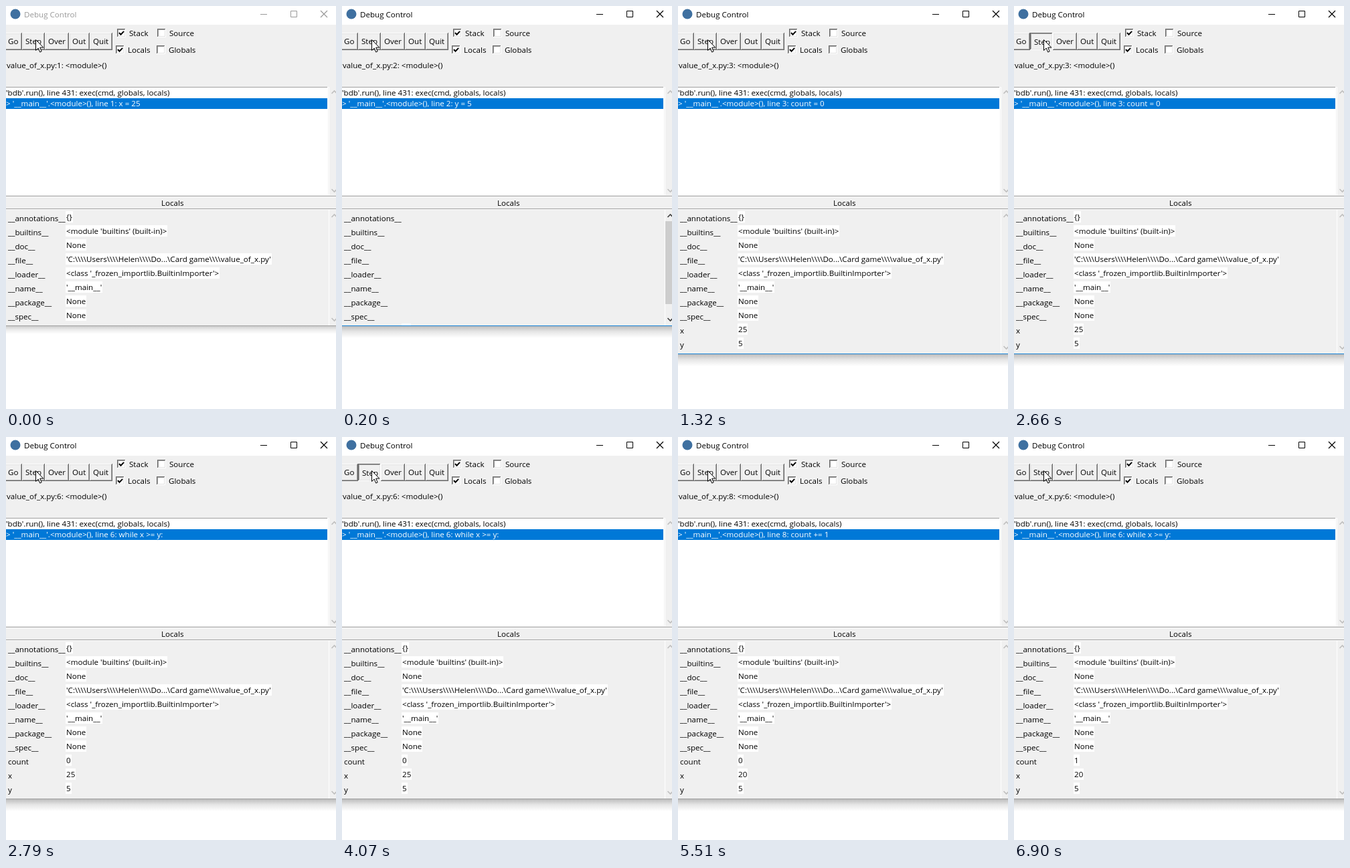
An HTML page for the animation above (8340 ms loop, 493 by 603 pixels).

```html
<!DOCTYPE html>
<html lang="en">
<head>
<meta charset="utf-8">
<title>Debug Control</title>
<style>
  html, body { margin: 0; width: 100%; height: 100%; overflow: hidden; background: #fff; }
  svg { display: block; width: 493px; height: 603px; }
  text { font: 11.6px "Open Sans", "Noto Sans", sans-serif; white-space: pre; }
  rect { shape-rendering: crispEdges; }
</style>
</head>
<body>
<svg id="stage" viewBox="0 0 493 603">
  <defs>
    <linearGradient id="fade" x1="0" y1="0" x2="0" y2="1">
      <stop offset="0" stop-color="#000" stop-opacity=".26"/>
      <stop offset=".45" stop-color="#000" stop-opacity=".1"/>
      <stop offset="1" stop-color="#000" stop-opacity="0"/>
    </linearGradient>
  </defs>
</svg>
<script>
const LOOP = 8340;
const ROW = 21;
const FACE = '#f0f0f0';
const GREY = '#a0a0a0';
const BLUE = '#1883d7';
const stage = document.getElementById('stage');

const CODE = {
  1: 'x = 25', 2: 'y = 5', 3: 'count = 0',
  6: 'while x >= y:', 7: 'x -= y', 8: 'count += 1'
};

const MODULE = [
  ['__annotations__', '{}'],
  ['__builtins__', "<module 'builtins' (built-in)>"],
  ['__doc__', 'None'],
  ['__file__', String.raw`'C:\\\\Users\\\\Helen\\\\Do...\Card game\\\\value_of_x.py'`],
  ['__loader__', "<class '_frozen_importlib.BuiltinImporter'>"],
  ['__name__', "'__main__'"],
  ['__package__', 'None'],
  ['__spec__', 'None']
];

// Each step changes only the listed fields.
const STEPS = [
  [0, { line: 1, vars: [], rows: 8, active: false, down: false, cleared: false, edge: GREY, hide: '' }],
  [100, { active: true, down: true, edge: BLUE }],
  [200, { line: 2, vars: [['x', 25]], down: false, cleared: true }],
  [240, { rows: 9, cleared: false, edge: GREY }],
  [1170, { down: true }],
  [1270, { line: 3, vars: [['x', 25], ['y', 5]], down: false, cleared: true, edge: BLUE }],
  [1320, { rows: 10, cleared: false }],
  [2660, { down: true }],
  [2760, { line: 6, vars: [['count', 0], ['x', 25], ['y', 5]], down: false, cleared: true }],
  [2790, { rows: 11, cleared: false, edge: GREY }],
  [4070, { down: true }],
  [4150, { line: 7, down: false }],
  [5410, { down: true }],
  [5460, { line: 8, down: false, hide: 'x' }],
  [5510, { vars: [['count', 0], ['x', 20], ['y', 5]], hide: '' }],
  [6850, { down: true }],
  [6900, { line: 6, vars: [['count', 1], ['x', 20], ['y', 5]], down: false }]
];

let state = {};
const states = STEPS.map(([at, change]) => (state = { ...state, ...change, at }));

function add(parent, tag, attrs) {
  const el = document.createElementNS('http://www.w3.org/2000/svg', tag);
  for (const key in attrs) el.setAttribute(key, attrs[key]);
  return parent.appendChild(el);
}

const box = (g, x, y, width, height, fill) => add(g, 'rect', { x, y, width, height, fill });

const path = (g, d, stroke, width = 1) =>
  add(g, 'path', { d, stroke, 'stroke-width': width, fill: 'none' });

function label(g, x, y, str, fill = '#000') {
  const el = add(g, 'text', { x, y, fill });
  el.textContent = str;
  return el;
}

function bevel(g, x, y, w, h, sunken, fill = FACE) {
  const light = ['#fff', '#e3e3e3'], dark = ['#696969', GREY];
  const [near, far] = sunken ? [dark, light] : [light, dark];
  for (const i of [0, 1]) {
    const w2 = w - 2 * i, h2 = h - 2 * i;
    box(g, x + i, y + i, w2, h2, far[i]);
    box(g, x + i, y + i, w2 - 1, h2 - 1, near[i]);
  }
  box(g, x + 2, y + 2, w - 4, h - 4, fill);
}

function button(g, x, right, textX, str, down) {
  bevel(g, x, 40, right - x, 26, down);
  label(g, textX + (down ? 1 : 0), 57 + (down ? 1 : 0), str);
}

function check(g, x, y, str, on) {
  bevel(g, x, y, 13, 13, true, '#fff');
  if (on) path(g, `M${x + 3} ${y + 6}l2.5 2.7l4.6 -4.8`, '#000', 2);
  label(g, x + 18, y + 11, str);
}

function arrow(g, y, dir, color) {
  path(g, `M486.5 ${y + 2 * dir}l4 ${-4 * dir}l4 ${4 * dir}`, color, 1.6);
}

// A dark line with a light one under it.
function groove(g, y) {
  box(g, 0, y, 493, 1, GREY);
  box(g, 0, y + 1, 493, 1, '#fff');
}

function titleBar(g, active) {
  const ink = active ? '#000' : '#999';
  box(g, 0, 0, 493, 28, '#fff');
  add(g, 'circle', { cx: 14, cy: 12, r: 7.5, fill: '#3f70a0' });
  label(g, 27, 17, 'Debug Control', ink);
  path(g, 'M380 12.5h10M425.5 7.5h9v9h-9z', ink);
  path(g, 'M470 7l10 10M480 7l-10 10', ink, 1.2);
}

function controls(g, s) {
  button(g, -2, 24, 3, 'Go');
  button(g, 24, 58, 29, 'Step', s.down);
  button(g, 58, 94, 63, 'Over');
  button(g, 94, 125, 99, 'Out');
  button(g, 125, 159, 130, 'Quit');
  check(g, 166, 34, 'Stack', true);
  check(g, 226, 34, 'Source');
  check(g, 164, 59, 'Locals', true);
  check(g, 225, 59, 'Globals');
  label(g, 1, 93, `value_of_x.py:${s.line}: <module>()`);
}

function stack(g, line) {
  box(g, 0, 121, 481, 162, '#fff');
  box(g, 0, 121, 480, 1, GREY);
  label(g, 0, 134, "'bdb'.run(), line 431: exec(cmd, globals, locals)");
  box(g, 0, 138, 480, 16, '#0078d7');
  label(g, 0, 150, `> '__main__'.<module>(), line ${line}: ${CODE[line]}`, '#fff');
  box(g, 482, 121, 1, 162, '#fff');
  arrow(g, 129, 1, '#bfbfbf');
  arrow(g, 276, -1, '#bfbfbf');
}

function value(g, y, str) {
  const back = box(g, 89, y - 13, 0, 17, '#fff');
  const width = label(g, 90, y, str).getComputedTextLength();
  back.setAttribute('width', Math.round(width) + 2);
}

function locals(g, s, bottom) {
  groove(g, 284);
  groove(g, 303);
  label(g, 232, 299, 'Locals');

  [...MODULE, ...s.vars].slice(0, s.rows).forEach(([name, val], i) => {
    if (name === s.hide) return;
    const y = 322 + i * ROW;
    label(g, 3, y, name);
    if (!s.cleared) value(g, y - 2, val);
  });

  const ink = s.cleared ? '#404040' : '#bfbfbf';
  box(g, 482, 305, 1, bottom - 305, '#fff');
  if (s.cleared) {
    box(g, 89, bottom - 3, 14, 3, '#fff');
    box(g, 483, 322, 10, bottom - 354, '#cdcdcd');
  }
  arrow(g, 314, 1, ink);
  arrow(g, bottom - 9, -1, ink);
}

function draw(s) {
  const bottom = 310 + s.rows * ROW;
  scene.replaceChildren();
  add(scene, 'rect', {
    x: 0, y: bottom + 1, width: 493, height: s.active ? 18 : 12,
    fill: 'url(#fade)', opacity: s.active ? 1 : 0.75
  });
  box(scene, 0, 28, 493, bottom - 28, FACE);
  titleBar(scene, s.active);
  controls(scene, s);
  stack(scene, s.line);
  locals(scene, s, bottom);
  box(scene, 0, bottom, 493, 1, s.edge);
  add(scene, 'path', {
    d: 'M44.5 50.5v16l3.7-3.5l2.5 6l2.5-1.1l-2.5-5.8h5.1z',
    fill: '#fff', stroke: '#000', 'stroke-width': 1
  });
}

const scene = add(stage, 'g', {});
const start = performance.now();
let shown;

function tick() {
  const t = (performance.now() - start) % LOOP;
  const now = states.findLast(s => s.at <= t);
  if (now !== shown) draw(shown = now);
  requestAnimationFrame(tick);
}
tick();
</script>
</body>
</html>
```
